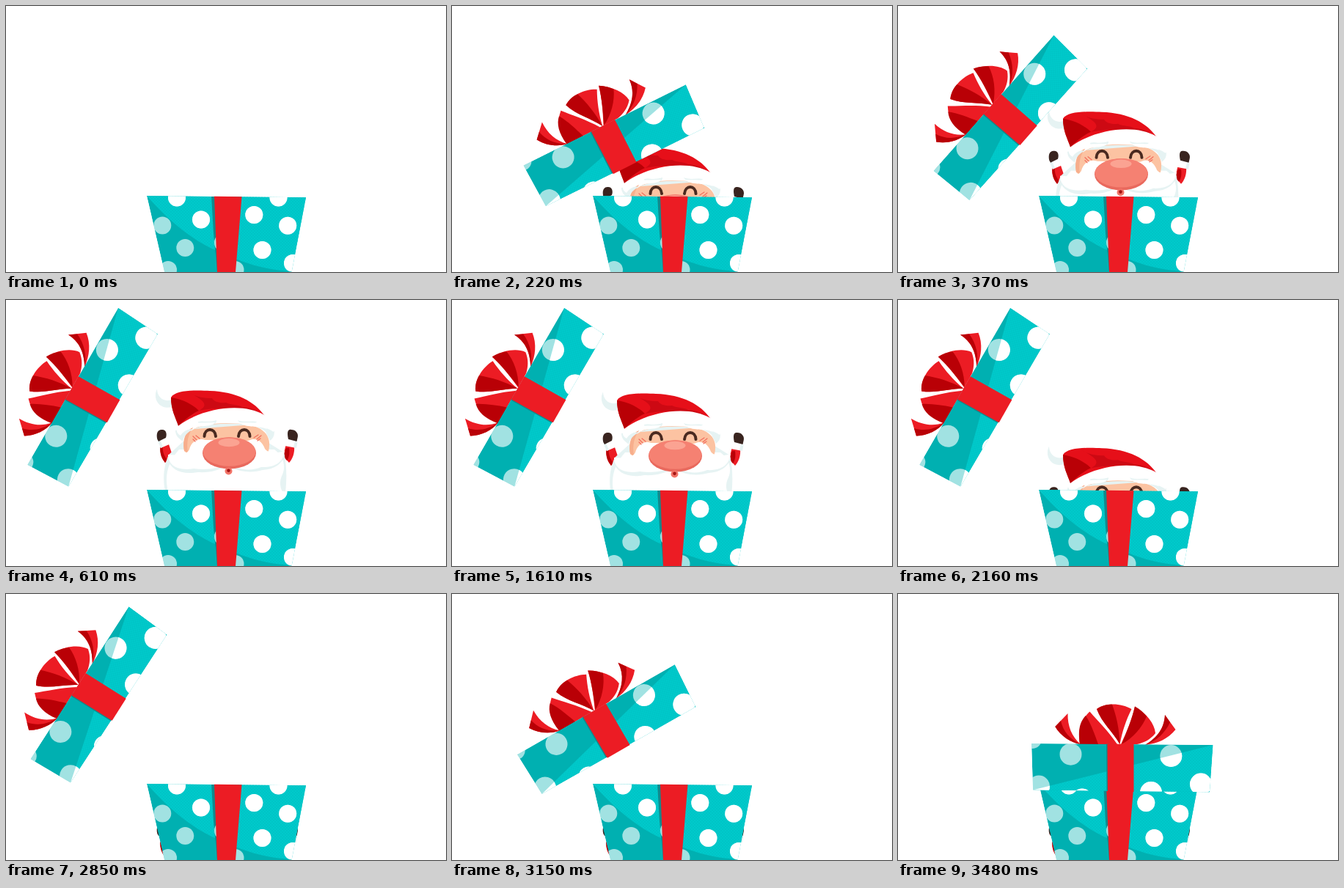
An HTML page for the animation above (7480 ms loop, 600 by 363 pixels).

```html
<!DOCTYPE html>
<html lang="en">
<head>
<meta charset="utf-8">
<title>Gift box surprise</title>
<style>
  html, body { margin: 0; width: 100%; height: 100%; overflow: hidden; background: #fff; }
  svg { display: block; width: 100vw; height: 100vh; }
  .light { fill: #00cacb; }
  .dark { fill: #00b0b1; }
  .tone { fill: url(#tone); }
  .edge { fill: #12898c; }
  .red { fill: #ec1c24; }
  .deep { fill: #b90006; }
  .white { fill: #fff; }
  .pale { fill: #e6f3f3; }
  .skin { fill: #fcc3a2; }
  .glove { fill: #39241f; }
  .veil { fill: #fff; opacity: .63; }
  .brow { fill: none; stroke: #4a2a20; stroke-width: 4; stroke-linecap: round; }
  .blush { fill: none; stroke: #f2705f; stroke-width: 1.3; stroke-linecap: round; }
</style>
</head>
<body>
<svg viewBox="0 0 600 363" preserveAspectRatio="none">
  <defs>
    <pattern id="tone" width="4" height="4" patternUnits="userSpaceOnUse">
      <circle cx="1" cy="1" r=".75" fill="#00bcbe"/>
      <circle cx="3" cy="3" r=".75" fill="#00bcbe"/>
    </pattern>

    <path id="boxShape" d="M192 259 L409 261.3 L389.5 363 H216 Z"/>
    <path id="boxLight" d="M192 259 C222 293 252 318 285 333 C320 349 352 361 392 362 L412 258 Z"/>
    <clipPath id="boxClip"><use href="#boxShape"/></clipPath>
    <clipPath id="boxLightClip"><use href="#boxLight"/></clipPath>
    <g id="boxDots">
      <circle cx="233" cy="261.5" r="12"/><circle cx="266" cy="291.5" r="12"/>
      <circle cx="371.5" cy="261.5" r="12"/><circle cx="338.3" cy="285" r="12"/>
      <circle cx="384.2" cy="299.7" r="12"/><circle cx="349.5" cy="333" r="12"/>
      <circle cx="391" cy="351" r="12"/><circle cx="213.3" cy="299.5" r="12"/>
      <circle cx="244.3" cy="330" r="12"/><circle cx="221" cy="360" r="12"/>
      <circle cx="312.5" cy="360" r="12"/>
    </g>

    <path id="lidShape" d="M182 204 L429.5 206 L425 270.3 L184 267.5 Z"/>
    <path id="lidLight" d="M184 267.5 L429.5 206 L425 272 Z"/>
    <clipPath id="lidClip"><use href="#lidShape"/></clipPath>
    <clipPath id="lidLightClip"><use href="#lidLight"/></clipPath>
    <g id="lidDots">
      <circle cx="235.5" cy="218.7" r="15"/><circle cx="372.3" cy="221" r="15"/>
      <circle cx="192" cy="262.5" r="15"/><circle cx="413" cy="259.5" r="15"/>
      <circle cx="345" cy="271" r="15"/><circle cx="251" cy="279.5" r="14"/>
      <circle cx="183" cy="198" r="13"/>
    </g>
  </defs>

  <rect width="600" height="363" class="white"/>

  <g id="santa">
    <!-- arms -->
    <path class="red" d="M211 197 C209 206 211 215 217 222 L227 212 L222 197 Z"/>
    <path class="deep" d="M211 197 C209 206 211 215 217 222 L220 218 C214 211 213 204 214 197 Z"/>
    <path class="white" d="M207 193 L220 187 L225 196 L211 202 Z"/>
    <path class="pale" d="M207 193 L210 191 L214 200.500 L211 202 Z"/>
    <path class="glove" d="M206.300 190 C204.500 182 207 177 212 177 C218 176 220 182 218 188 L208 193 Z"/>
    <path class="red" d="M382 196 L393 198 C394 208 391 217 386 222 L378 213 Z"/>
    <path class="deep" d="M382 202 L386 202 C387 209 386 215 383 219 L378 213 Z"/>
    <path class="white" d="M383 190 L397.500 193 L396 202 L380 199 Z"/>
    <path class="pale" d="M394 193 L397.500 194 L396 202 L392 201 Z"/>
    <path class="glove" d="M385 190 C383 181 384 176 389 177 C395 177 399 182 397.800 187 L396.500 193 Z"/>

    <!-- beard -->
    <path class="pale" d="M222 211 C214 228 214 246 217 262 H381 C383 245 383 226 379 208 L350 190 H245 Z"/>
    <path class="white" d="M236 204 C220 222 216 240 221 262 H377 C374 256 372 248 377 238 C382 226 378 213 366 204 Z"/>
    <path class="pale" d="M220 216 C224 232 240 239 262 235 C278 236 292 232 300 226 L304 226 C314 234 334 237 350 232 C366 231 377 224 380 211 L340 206 H262 Z"/>

    <!-- face -->
    <path class="skin" d="M243 206 C239 184 252 168 302 167 C352 168 363 184 358 206 C345 222 258 222 243 206 Z"/>
    <path fill="#f7ae8c" d="M243 206 C240 190 245 178 256 173 C248 183 246 194 248 208 Z"/>
    <path class="white" d="M272 191 C260 187 252 195 250 204 C246 212 234 212 221 211 C221 225 234 234 256 230 C276 233 293 229 303 222 C315 232 334 234 348 228 C366 229 378 222 380 206 C368 210 357 209 353 203 C350 194 342 186 330 192 Z"/>
    <path class="brow" d="M270.500 186 C271 174 285 174 286 186"/>
    <path class="brow" d="M317 186 C318 174 332 174 332.500 186"/>
    <path class="blush" d="M255 186 l5 5 M259 185 l5 4 M255 190 l3 3 M348 185 l-6 5 M344 184 l-6 4 M347 189 l-4 3"/>

    <!-- nose and mouth -->
    <ellipse cx="304.500" cy="209" rx="36.500" ry="21.500" fill="#e9695d"/>
    <ellipse cx="304.500" cy="207" rx="36" ry="19.700" fill="#f58172"/>
    <ellipse cx="304" cy="194.500" rx="14.500" ry="5.800" fill="#fba392"/>
    <circle cx="303.500" cy="233.500" r="5" fill="#f27468"/>
    <circle cx="303.500" cy="232.800" r="2.300" fill="#a51414"/>

    <!-- hat -->
    <path class="pale" d="M206 121.500 C201 131 205 144 217 146.500 C222 147.500 227 146 229 143 L226 136 C216 140 206 133 206 121.500 Z"/>
    <path fill="#e60f19" d="M225 133 C231 122 262 123 278 124 C314 125 340 139 352.500 158 C325 146 277 146 236 173 C231 160 225 150 225 133 Z"/>
    <path class="deep" d="M225 133 C234 134 251 139 263 151 C252 156 244 163 235 172 C231 160 225 150 225 133 Z"/>
    <path fill="#cd0913" d="M248 125 C256 131 266 134 281 134 C284 139 291 141 300 140 C307 144 316 142 322 146 C331 146 342 150 352 158 C325 146 290 146 263 151 C280 142 265 135 248 125 Z"/>
    <path class="pale" d="M231 178 C231 187 238 190 241 193 C243 181 256 173 280 170 C305 168 341 167 354 180 L360 192 C368 186 367 177 362 168 Z"/>
    <path class="white" d="M236 171 C270 146 325 140 352 157 C364 162 369 174 365 180 C356 174 343 169 300 168 C262 169 243 176 238 185 C232 182 231 176 236 171 Z"/>
    <path class="pale" d="M262 166 C268 164 274 168 287 164 C288 171 274 173 263 170 Z M316 164 C326 168 334 164 342 166 C338 172 320 172 316 164 Z"/>
    <path class="white" d="M246 176 C252 166 264 168 285 167 C280 174 262 171 246 176 Z M318 167 C336 168 348 165 356 176 C344 171 326 175 318 167 Z"/>
  </g>

  <g id="box">
    <g clip-path="url(#boxClip)">
      <use href="#boxShape" class="dark"/>
      <use href="#boxLight" class="light"/>
      <use href="#boxLight" class="tone"/>
      <use href="#boxDots" class="veil"/>
      <use href="#boxDots" class="white" clip-path="url(#boxLightClip)"/>
      <path class="edge" d="M280 258 H286 L289 363 H288 L283 310 Z"/>
      <ellipse cx="289" cy="323" rx="5" ry="9" fill="#a0e3e3"/>
    </g>
    <path class="red" d="M284 259.800 L321.500 260.300 L313 363 H288 Z"/>
  </g>

  <g id="lid">
    <!-- bow -->
    <path class="red" d="M231.500 163 C231 180 237 195 249 205 C236 203 222 194 214.300 181 Z"/>
    <path class="deep" d="M222 173 C225 187 234 198 249 205 C236 203 222 194 214.300 181 Z"/>
    <path class="red" d="M261.500 160.500 C272 173 286 186 299 205 H248 C245 186 249 172 261.500 160.500 Z"/>
    <path class="deep" d="M256 166 C264 179 268 191 273 205 H248 C245 186 248 174 256 166 Z"/>
    <path class="red" d="M271 157 C284 148 304 149 318.500 157 C311 172 306 187 302.500 205 C293 188 278 176 271 157 Z"/>
    <path class="deep" d="M271 157 C278 152 285 150.500 292 150.700 C298 167 302 185 302.500 205 C293 188 278 176 271 157 Z"/>
    <path class="red" d="M323 153.500 C339 163 350 177 351 190 C344 199 335 203 326 205 H304 C312 188 319 171 323 153.500 Z"/>
    <path class="deep" d="M323 153.500 C330 157 335 162 339 167 C333 182 321 196 305 205 C312 188 319 171 323 153.500 Z"/>
    <path class="red" d="M364 165 L378.500 185 C368 198 354 204 337 206 C353 196 363 184 364 165 Z"/>
    <path class="deep" d="M364 165 L371 175 C364 190 353 200 337 206 C353 196 363 184 364 165 Z"/>

    <g clip-path="url(#lidClip)">
      <use href="#lidShape" class="dark"/>
      <use href="#lidLight" class="light"/>
      <use href="#lidLight" class="tone"/>
      <use href="#lidDots" class="veil"/>
      <use href="#lidDots" class="white" clip-path="url(#lidLightClip)"/>
      <path class="edge" d="M284 203 H288 V272 H284.500 Z"/>
    </g>
    <path class="red" d="M285.500 204.800 H321.500 V270 H286 Z"/>
  </g>
</svg>

<script>
  const LOOP = 7480, TICK = 30, DEPTH = 137;
  const santa = document.getElementById('santa');
  const lid = document.getElementById('lid');

  // Progress from a to b, advancing once per tick
  const part = (t, a, b) => {
    const k = Math.floor((t - a) / TICK + 1e-6) * TICK / (b - a);
    return Math.min(1, Math.max(0, k));
  };
  const easeOut = (k, n) => 1 - (1 - k) ** n;

  function santaDepth(t) {
    if (t < 1580) return DEPTH * (1 - easeOut(part(t, 100, 610), 2.5));
    const k = part(t, 1580, 2520);
    return 127 * k + 10 * k ** 4;
  }

  function lidOpen(t) {
    return t < 2820 ? easeOut(part(t, 100, 610), 2.2) : 1 - part(t, 2820, 3480);
  }

  function draw(t) {
    const shown = t < 130 ? 'hidden' : 'visible';
    santa.setAttribute('visibility', shown);
    lid.setAttribute('visibility', shown);
    santa.setAttribute('transform', `translate(0 ${santaDepth(t)})`);
    const p = lidOpen(t);
    lid.setAttribute('transform',
      `translate(${-186.5 * p} ${-102.6 * p}) rotate(${-60.4 * p} 305 237)`);
  }

  const start = performance.now();
  function frame() {
    draw((performance.now() - start) % LOOP);
    requestAnimationFrame(frame);
  }
  draw(0);
  requestAnimationFrame(frame);
</script>
</body>
</html>
```
